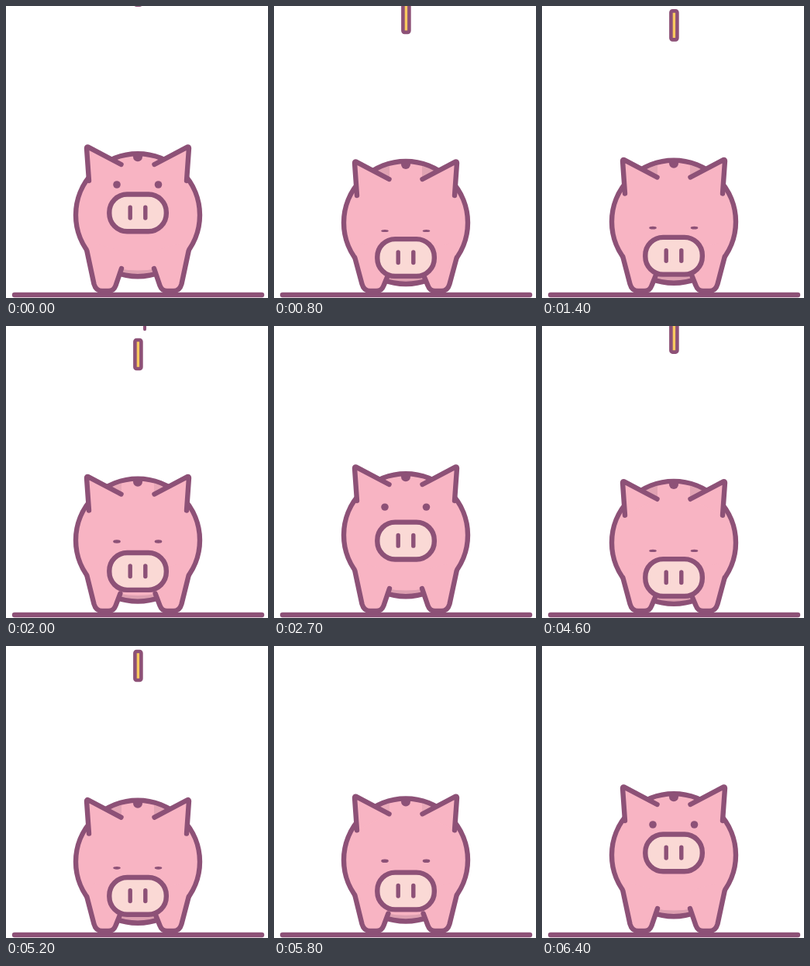
Recreate the animation shown at these times as an HTML page. Size 338x376 px, loop 6500 ms.

```html
<!DOCTYPE html>
<html lang="en">
<head>
<meta charset="utf-8">
<title>Piggy bank</title>
<style>
  html, body { margin: 0; width: 100%; height: 100%; overflow: hidden; background: #fff; }
  svg { display: block; width: 100%; height: 100%; }
  .line { fill: none; stroke: #8d5177; stroke-width: 6.4; stroke-linecap: round; stroke-linejoin: round; }
  .ink { fill: #8d5177; }
  .skin { fill: #f8b4c3; }
  .shade { fill: #dc9fb0; }
</style>
</head>
<body>
<svg viewBox="0 0 338 376">
  <path class="line" d="M11 372H330"/>
  <g id="coins"></g>

  <g id="body">
    <ellipse class="skin" cx="170" cy="269.2" rx="80" ry="79"/>
    <path class="shade" d="M145 338Q170 343 195 338V345Q170 351 145 345Z"/>
    <g id="earShade" class="shade">
      <path d="M149 213V192L130 201L120 210Z"/>
      <path d="M191 213V192L210 201L220 210Z"/>
    </g>
    <ellipse class="line" cx="170" cy="269.2" rx="80" ry="79"/>
    <circle class="ink" cx="170" cy="194.3" r="6"/>
  </g>

  <g id="legs">
    <g><path class="skin"/><path class="line"/></g>
    <g transform="matrix(-1 0 0 1 340 0)"><path class="skin"/><path class="line"/></g>
  </g>

  <g id="ears">
    <g><path class="skin" d="M107 225L104 182L149 204Z"/>
       <path class="line" d="M107 225L104 183Q104 181 106 181.6L148.5 204"/></g>
    <g transform="matrix(-1 0 0 1 340 0)"><path class="skin" d="M107 225L104 182L149 204Z"/>
       <path class="line" d="M107 225L104 183Q104 181 106 181.6L148.5 204"/></g>
  </g>

  <g id="eyes" class="ink">
    <ellipse cx="143" cy="230" rx="4.8"/>
    <ellipse cx="196.5" cy="230" rx="4.8"/>
  </g>

  <g id="snout">
    <rect class="line" x="133.3" y="242.5" width="73.5" height="47.8" rx="23" style="fill:#fad9d5"/>
    <path class="line" style="stroke-width:5.4" d="M160.2 259.3V273M179.8 259.3V273"/>
  </g>
</svg>
<script>
  const LOOP = 6500, ROUND = 3234;
  const STARTS = [0, 541, 1108, 1672];
  const HIT = 610, DOWN = 795;
  const $ = id => document.getElementById(id);

  const clamp = x => Math.max(0, Math.min(1, x));
  const ease = x => (1 - Math.cos(Math.PI * clamp(x))) / 2;
  const shift = (id, y) => $(id).setAttribute('transform', `translate(0 ${y.toFixed(2)})`);

  $('coins').innerHTML = STARTS.map(() => `<g>
    <path class="line" style="stroke-width:4" d="M179 -81V-53M161 -90V-72"/>
    <rect class="line" x="166.4" y="-39.3" width="8" height="37" rx="2" style="fill:#fbc95f;stroke-width:4.6"/>
  </g>`).join('');
  const coins = [...$('coins').children];
  const eyes = [...$('eyes').children];
  const legs = [...$('legs').children];

  // Squash amount: pressed down after a hit, held until `hold`, released over `back` ms.
  const press = (u, hold, back) =>
    u < hold ? ease((u - HIT) / (DOWN - HIT)) : 1 - ease((u - hold) / back);

  function draw(t) {
    const s = t < ROUND ? t : t - ROUND;
    let u = 0;

    coins.forEach((coin, i) => {
      const age = s - STARTS[i];
      const shown = age >= 0 && age < 720;
      coin.style.display = shown ? '' : 'none';
      if (shown) coin.setAttribute('transform', `translate(0 ${(1 + 520e-6 * age * age).toFixed(2)})`);
      if (age >= HIT) u = age;
    });

    const body = press(u, 812, 204);
    const eye = press(u, 820, 245);
    const nose = press(u, 824, 283);

    shift('body', 9.8 * body);
    shift('ears', 19 * body);
    shift('eyes', 59.5 * eye);
    shift('snout', 57.6 * nose);
    $('earShade').style.opacity = 0.8 * body;
    eyes.forEach(e => e.setAttribute('ry', 4.8 - 3.2 * eye));

    const top = `104.3 ${315 + 9 * body}`;
    const edge = `L113.5 358Q116 367 124 367H132Q139 367 141.5 360L${149 - 2.5 * body} ${338 + 10 * body}`;
    legs.forEach(({ children: [fill, outline] }) => {
      fill.setAttribute('d', `M${top}${edge}V315L113 305Z`);
      outline.setAttribute('d', `M${top}${edge}`);
    });
  }

  const begin = performance.now();
  function tick() {
    draw((performance.now() - begin) % LOOP);
    requestAnimationFrame(tick);
  }
  draw(0);
  requestAnimationFrame(tick);
</script>
</body>
</html>
```
